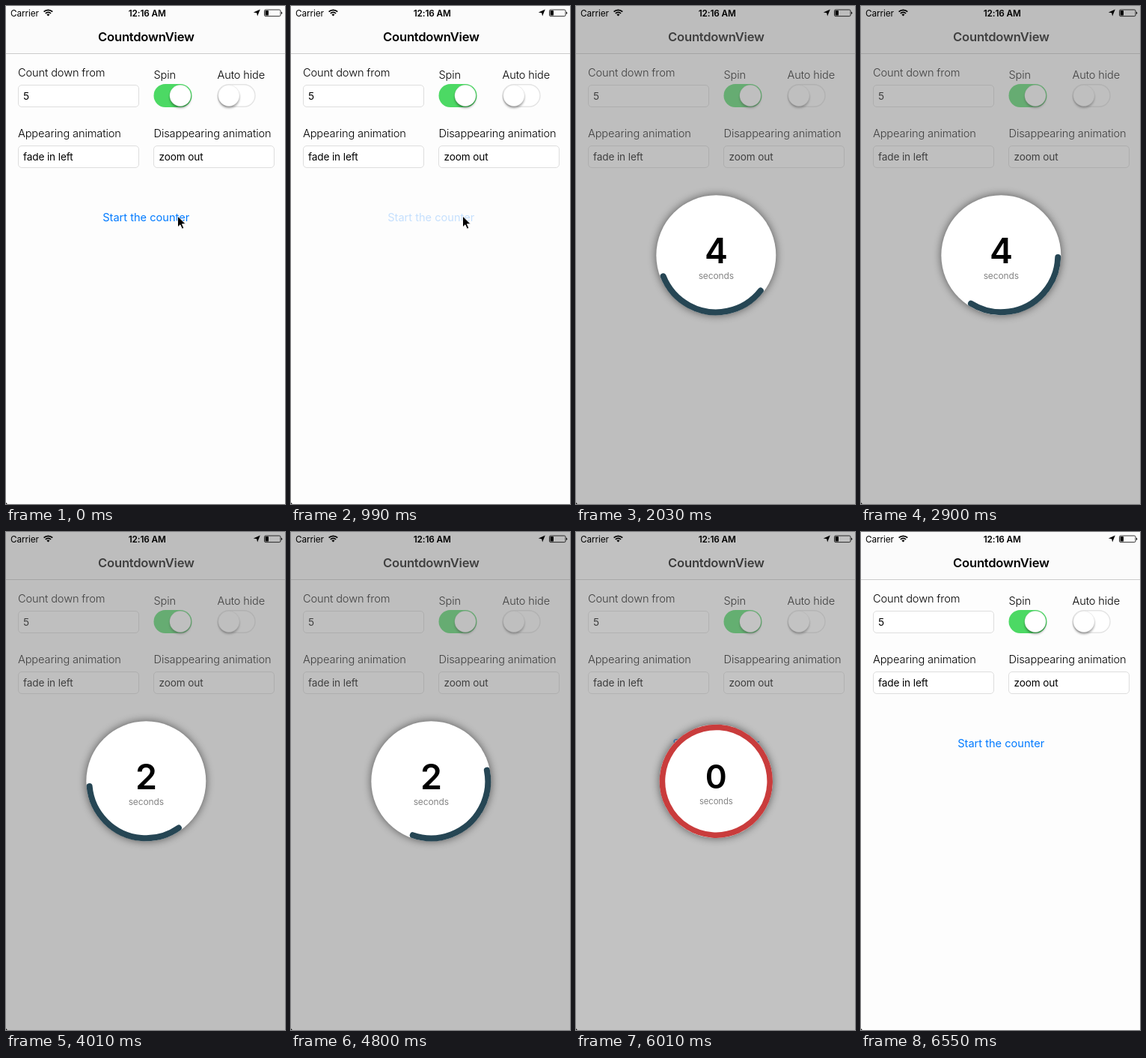
Animation of 373 by 664 pixels, one loop 6.79 s. Source, as an HTML page:

```html
<!DOCTYPE html>
<html lang="en">
<head>
<meta charset="utf-8">
<title>CountdownView</title>
<style>
  html, body { margin: 0; height: 100%; overflow: hidden; background: #fdfdfd; }
  svg { display: block; width: 100vw; height: 100vh; }
  text { font-family: Inter, sans-serif; letter-spacing: -.12px; }
  .label { font-size: 14.6px; font-weight: 300; }
  .input { font-size: 13.6px; }
  .field { fill: #fff; stroke: #dedede; }
  .mid { text-anchor: middle; }
</style>
</head>
<body>
<svg viewBox="0 0 373 664">
  <defs>
    <filter id="blur" x="-20%" y="-20%" width="140%" height="140%"><feGaussianBlur stdDeviation="6"/></filter>
    <filter id="soft" x="-30%" y="-30%" width="160%" height="160%"><feGaussianBlur stdDeviation="1.7"/></filter>
    <g id="knob">
      <circle cy="2.6" r="14" opacity=".36" filter="url(#soft)"/>
      <circle r="14.2" fill="#fff" stroke="#000" stroke-opacity=".12" stroke-width=".6"/>
    </g>
  </defs>

  <rect width="373" height="664" fill="#fdfdfd"/>
  <rect width="373" height="63" fill="#fbfbfb"/>
  <rect y="63" width="373" height="1" fill="#cbcbcb"/>
  <text class="mid" x="187.4" y="47" style="font-size:16.6px;font-weight:600;letter-spacing:-.24px">CountdownView</text>

  <g class="label">
    <text x="16" y="93.5">Count down from</text>
    <text x="197.5" y="97">Spin</text>
    <text x="282.5" y="97">Auto hide</text>
    <text x="16" y="174.5">Appearing animation</text>
    <text x="197.5" y="174.5">Disappearing animation</text>
  </g>
  <rect class="field" x="16.5" y="105.5" width="161" height="29" rx="4.5"/>
  <rect class="field" x="16.5" y="186.5" width="161" height="29" rx="4.5"/>
  <rect class="field" x="197.5" y="186.5" width="161" height="29" rx="4.5"/>
  <g class="input">
    <text x="23" y="125">5</text>
    <text x="23" y="205.5">fade in left</text>
    <text x="204.5" y="205.5">zoom out</text>
  </g>
  <rect x="197.5" y="104" width="51" height="31" rx="15.5" fill="#4cd964"/>
  <use href="#knob" x="233" y="119.5"/>
  <rect x="283" y="104.7" width="50" height="29.6" rx="14.8" fill="#fff" stroke="#e4e4e4" stroke-width="1.4"/>
  <use href="#knob" x="298" y="119.5"/>
  <text id="start" class="mid" x="187.2" y="287" fill="#007aff" style="font-size:14.6px;letter-spacing:0">Start the counter</text>

  <rect id="overlay" width="373" height="664" fill="#808080"/>

  <g id="counter">
    <circle r="80" opacity=".55" filter="url(#blur)"/>
    <circle r="80" fill="#fff"/>
    <path id="arc" fill="none" stroke-width="8" stroke-linecap="round"/>
    <text id="count" class="mid" y="10.3" font-size="46.5" font-weight="600"></text>
    <text class="mid" y="32" font-size="12" fill="#858585">seconds</text>
  </g>

  <g id="status">
    <text x="6" y="13.5" font-size="11.8">Carrier</text>
    <text class="mid" x="188.8" y="13.5" font-size="11.8" font-weight="600">12:16 AM</text>
    <g fill="none" stroke="#000" stroke-width="1.8">
      <path d="M50.6 7.7a8.2 8.2 0 0 1 11.6 0M52.8 10a5 5 0 0 1 7.2 0"/>
    </g>
    <path d="M56.4 13.6l-2-2.1a2.9 2.9 0 0 1 4 0z"/>
    <path d="M339.8 4.6l-3.7 9-.9-4.3-4.4-.9z"/>
    <rect x="345.5" y="5" width="21.5" height="8.6" rx="1.6" fill="none" stroke="#000" stroke-width=".8"/>
    <rect x="346.6" y="6" width="4.4" height="6.6" rx=".6"/>
    <path d="M368 7.6a1.8 1.8 0 0 1 0 3.4z"/>
    <path d="M0 661.5a3 3 0 0 0 2 2.5h-2z"/>
  </g>
  <path id="cursor" d="M229.5 280v15l3.4-3.2 2.5 5.5 2.5-1.1-2.4-5.4h4.8z" stroke="#fff" stroke-width="1"/>
</svg>

<script>
const LOOP = 6790, PRESS = 780, RELEASE = 985, OPEN = 1000, CLOSE = 5945, GONE = 6520;
const FADE = 400, STEP = 990, LAST_SECOND = 4985;
const CX = 187.3, CY = 332.3, RADIUS = 76;
const BLUE = [38, 70, 84], RED = [201, 60, 60];
const parts = Object.fromEntries(
  ['start', 'overlay', 'counter', 'arc', 'count', 'cursor'].map(id => [id, document.getElementById(id)]));
const progress = (t, from, length) => Math.min(1, Math.max(0, (t - from) / length));

// Cubic Bezier easing with control points (x1, 0) and (x2, 1).
function ease(x1, x2, u) {
  let low = 0, high = 1;
  for (let i = 0; i < 20; i++) {
    const s = (low + high) / 2, r = 1 - s;
    if (3 * s * r * r * x1 + 3 * s * s * r * x2 + s ** 3 < u) low = s; else high = s;
  }
  return low * low * (3 - 2 * low);
}
const easeInOut = u => ease(.42, .58, u);
const easeOut = u => ease(0, .58, u);

function arcPath(start, sweep) {
  const point = degrees => {
    const a = degrees * Math.PI / 180;
    return `${RADIUS * Math.cos(a)} ${RADIUS * Math.sin(a)}`;
  };
  const arcTo = degrees => `A${RADIUS} ${RADIUS} 0 0 1 ${point(degrees)}`;
  return `M${point(start)}` + [1, 2, 3].map(i => arcTo(start + sweep * i / 3)).join('');
}

function draw(t) {
  const shown = easeInOut(progress(t, OPEN, FADE));
  const hidden = easeInOut(progress(t, CLOSE, FADE));
  const grow = easeOut(progress(t, LAST_SECOND, 1000));
  const redness = progress(t, LAST_SECOND, 250);

  parts.start.setAttribute('opacity', t < PRESS ? 1 : .2 + .8 * progress(t, RELEASE, 250));
  parts.overlay.setAttribute('opacity', .5 * shown * (1 - hidden));
  parts.cursor.style.display = t < 1400 ? '' : 'none';

  parts.counter.style.display = t > OPEN && t < GONE ? '' : 'none';
  parts.counter.setAttribute('transform',
    `translate(${CX - 373 * (1 - shown)} ${CY}) scale(${1 - .988 * hidden})`);
  parts.arc.setAttribute('d', arcPath(.372 * (t - 960) + 15 * grow, 120 + 240 * grow));
  parts.arc.setAttribute('stroke',
    `rgb(${BLUE.map((c, i) => Math.round(c + (RED[i] - c) * redness))})`);
  parts.count.textContent = Math.max(0, 5 - Math.floor(Math.max(0, t - RELEASE) / STEP));
}

const begin = performance.now();
function tick() {
  draw((performance.now() - begin) % LOOP);
  requestAnimationFrame(tick);
}
tick();
</script>
</body>
</html>
```
